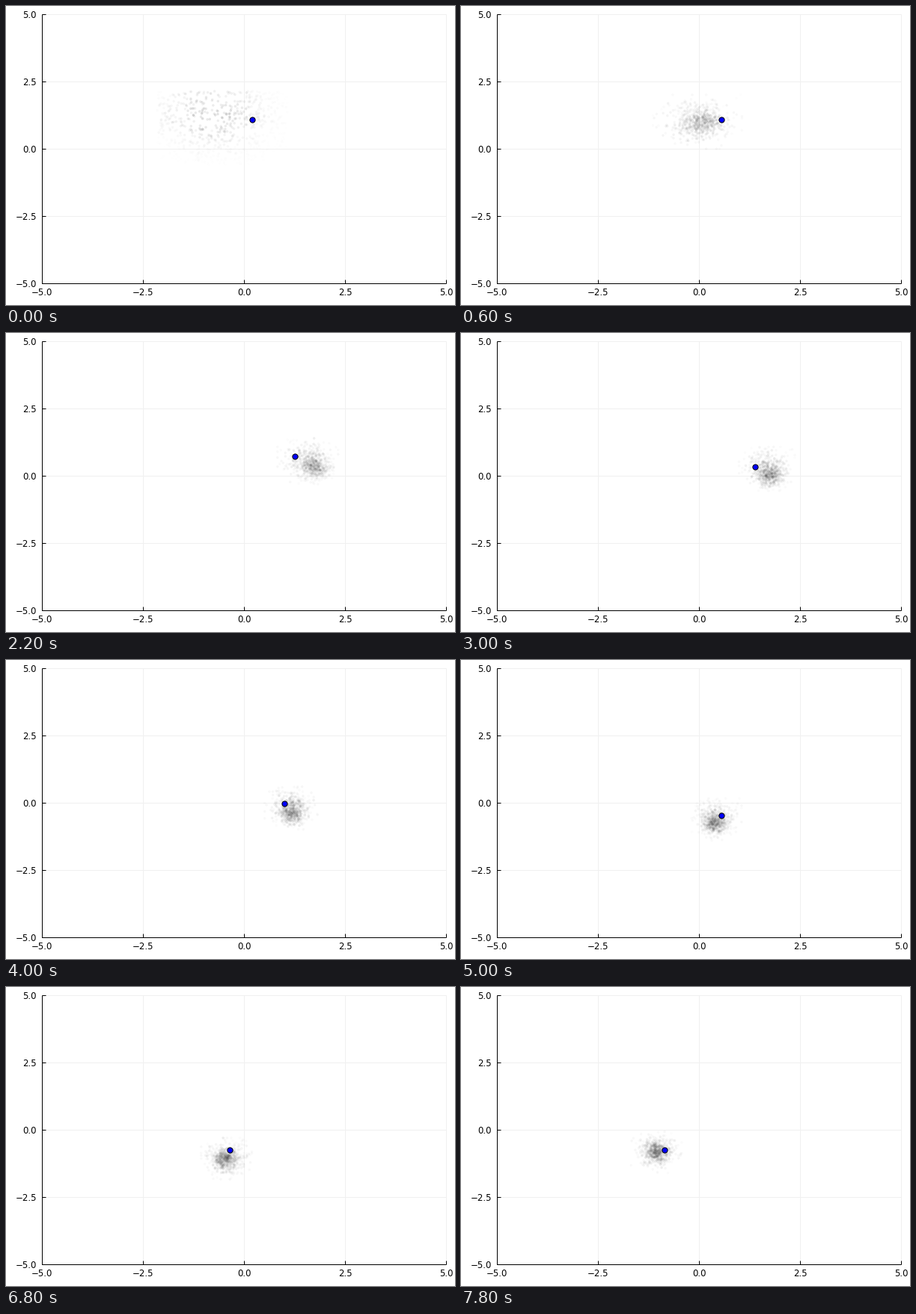
Write a matplotlib script that moves like this. It is 600x400 px and loops after 8 s.

```python
import numpy as np
import matplotlib.pyplot as plt
from matplotlib.animation import FuncAnimation

W, H, DPI = 600, 400, 100
FRAMES, STEP = 40, 200
N = 700
PT = 72 / DPI  # points per pixel

LEFT, TOP, RIGHT, BOTTOM = 48.5, 11.5, 588.5, 371.5

# key points: step, x, y in pixels
OBJECT = np.array([
    (0, 328.5, 152.2), (7, 370.5, 153.5), (15, 393.2, 179), (20, 371.6, 191.5),
    (25, 347.6, 208), (30, 320.3, 216.3), (39, 272, 217.6),
])
CLOUD = np.array([
    (0, 274, 148), (7, 367, 164), (13, 411, 176), (20, 381, 198),
    (30, 302, 226), (36, 290, 229), (39, 261, 221),
])

rng = np.random.default_rng(7)
BASE = rng.standard_normal((N, 2))
IN_CORE = np.arange(N) % 2 == 0


def along(keys, i):
    """Point at step i on a smooth cubic path through the keys."""
    t, p = keys[:, 0], keys[:, 1:]
    ahead = np.minimum(np.arange(len(t)) + 1, len(t) - 1)
    behind = np.maximum(np.arange(len(t)) - 1, 0)
    slope = (p[ahead] - p[behind]) / (t[ahead] - t[behind])[:, None]
    k = min(np.searchsorted(t, i, side="right") - 1, len(t) - 2)
    h = t[k + 1] - t[k]
    u = (i - t[k]) / h
    return ((2*u**3 - 3*u**2 + 1) * p[k] + (u**3 - 2*u**2 + u) * h * slope[k]
            + (3*u**2 - 2*u**3) * p[k + 1] + (u**3 - u**2) * h * slope[k + 1])


def first_cloud():
    """Even spread of particles, weighted around the first estimate."""
    r = np.random.default_rng(21)
    pos = r.uniform((202, 114), (376, 213), (N, 2))
    d = (pos - (278, 143)) / (42, 27)
    alpha = .12 * np.exp(-.5 * (d**2).sum(axis=1)) * r.uniform(.5, 1, N)
    return pos, alpha


def cloud_at(i):
    """Wide cloud that tightens, with a dense core circling its middle."""
    if i == 0:
        return first_cloud()
    r = np.random.default_rng(100 + i)
    z = np.clip(.8 * BASE + .6 * r.standard_normal((N, 2)), -2.5, 2.5)
    size = np.array((13.5 + 17 * np.exp(-i / 6), 11 + 5 * np.exp(-i / 8)))
    reach = 18 * (1 - i / FRAMES) * min(1, i / 7)
    turn = .5 + .07 * (i - 7)
    core = reach * np.array((np.cos(turn), np.sin(turn)))
    pos = along(CLOUD, i) + np.where(IN_CORE[:, None], core + .62 * size * z, size * z)
    alpha = .052 * r.uniform(.4, 1.2, N) * np.exp(-.09 * (z**2).sum(axis=1))
    return pos, alpha


fig = plt.figure(figsize=(W / DPI, H / DPI), dpi=DPI, facecolor="white")
ax = fig.add_axes((0, 0, 1, 1))
ax.set_xlim(0, W)
ax.set_ylim(H, 0)
ax.axis("off")


def line(xs, ys, color="black", z=2):
    ax.plot(xs, ys, color=color, lw=PT, zorder=z, solid_capstyle="butt", snap=False)


def label(x, y, value, ha):
    text = f"{value:.1f}".replace("-", "\u2212")
    ax.text(x, y, text, ha=ha, va="center_baseline", fontsize=11.7 * PT,
            family="DejaVu Sans", color="black")


for n, v in enumerate((-5, -2.5, 0, 2.5, 5)):
    gx = LEFT + n * (RIGHT - LEFT) / 4
    gy = BOTTOM - n * (BOTTOM - TOP) / 4
    line((gx, gx), (TOP, BOTTOM), "#f0f0f0", 1)
    line((LEFT, RIGHT), (gy, gy), "#f0f0f0", 1)
    line((gx, gx), (BOTTOM, BOTTOM - 5))
    line((LEFT, LEFT + 5), (gy, gy))
    label(gx - .5, 382.3, v, "center")
    label(41, gy - .4, v, "right")
line((LEFT, LEFT), (TOP, BOTTOM + .5))
line((LEFT - .5, RIGHT), (BOTTOM, BOTTOM))

dots = ax.scatter(np.zeros(N), np.zeros(N), s=(3.5 * PT)**2, linewidths=0,
                  zorder=3, snap=False)
dot, = ax.plot([], [], "o", ms=7.2 * PT, mfc="#0000ff", mec="black",
               mew=PT, zorder=4, snap=False)


def update(i):
    pos, alpha = cloud_at(i)
    rgba = np.zeros((N, 4))
    rgba[:, 3] = alpha
    dots.set_offsets(pos)
    dots.set_facecolors(rgba)
    x, y = along(OBJECT, i)
    dot.set_data([x], [y])
    return dots, dot


anim = FuncAnimation(fig, update, frames=FRAMES, interval=STEP,
                     repeat=True, repeat_delay=0, blit=False)
plt.show()
```
